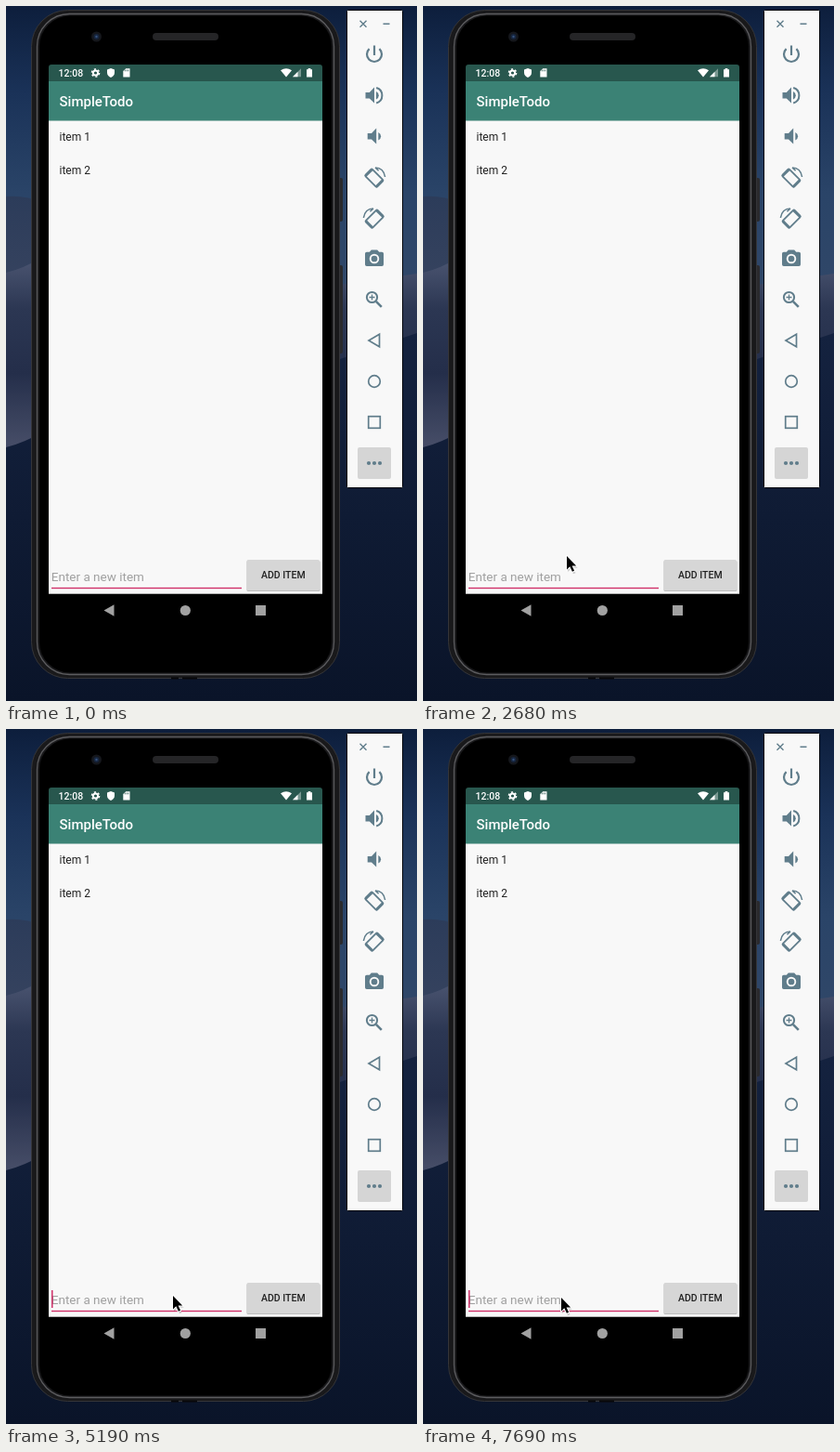
These frames come from a looping animation (443x748 px, 7.99 s). An HTML page:

```html
<!DOCTYPE html>
<html lang="en">
<head>
<meta charset="utf-8">
<title>Todo app</title>
<style>
  html, body { margin: 0; width: 100%; height: 100%; overflow: hidden; background: #0c1830; }
  svg { display: block; width: 100vw; height: 100vh; }
  text { font-family: Roboto, sans-serif; }
  .line { fill: none; stroke: #607d8b; stroke-width: 2; }
  .icon { fill: #607d8b; }
</style>
</head>
<body>
<svg viewBox="0 0 443 748" xmlns="http://www.w3.org/2000/svg">
  <defs>
    <linearGradient id="sky" x2="0" y2="1">
      <stop offset="0" stop-color="#0d1e3c"/>
      <stop offset=".3" stop-color="#1a3258"/>
      <stop offset=".65" stop-color="#2a4468"/>
      <stop offset="1" stop-color="#304768"/>
    </linearGradient>
    <linearGradient id="haze" x2="0" y2="1">
      <stop offset="0" stop-color="#2c3c5a"/>
      <stop offset="1" stop-color="#36435f"/>
    </linearGradient>
    <linearGradient id="dune" x2="0" y2="1">
      <stop offset="0" stop-color="#4c5672"/>
      <stop offset=".22" stop-color="#2c3753"/>
      <stop offset=".5" stop-color="#242e4a"/>
      <stop offset=".8" stop-color="#454c66"/>
    </linearGradient>
    <linearGradient id="sand" x2="0" y2="1">
      <stop offset="0" stop-color="#14223f"/>
      <stop offset="1" stop-color="#0a1429"/>
    </linearGradient>
  </defs>

  <!-- wallpaper -->
  <rect width="443" height="310" fill="url(#sky)"/>
  <path d="M0 205Q20 203 40 212V300H0Z" fill="url(#haze)"/>
  <path d="M0 287Q18 283 40 270L360 300L443 288V520H0Z" fill="url(#dune)"/>
  <path d="M0 475Q20 470 40 458L360 380L443 352V748H0Z" fill="url(#sand)"/>

  <!-- phone -->
  <g fill="#2a2a2d">
    <rect x="357" y="185" width="6" height="47" rx="2"/>
    <rect x="357" y="279" width="6" height="95" rx="2"/>
  </g>
  <rect x="27.5" y="4.5" width="332" height="719" rx="39" fill="#19191b" stroke="#353538"/>
  <rect x="33.5" y="8.5" width="320" height="711" rx="35" fill="none" stroke="#5c5c5f" stroke-width="1.3"/>
  <rect x="36" y="10.5" width="315" height="707" rx="33" fill="#000"/>
  <path d="M178 723.5h8M190 723.5h16" stroke="#08080a" stroke-width="2"/>
  <circle cx="97.5" cy="33" r="5.5" fill="#15171c"/>
  <circle cx="97.5" cy="33" r="3" fill="#17263f"/>
  <circle cx="97.5" cy="33" r="1.2" fill="#35527c"/>
  <rect x="158" y="29" width="71" height="8" rx="4" fill="#252527"/>

  <!-- screen -->
  <rect x="46" y="100" width="295" height="532.7" fill="#f8f8f8"/>
  <path d="M46 80.5V66Q46 63 49 63H338Q341 63 341 66V80.5Z" fill="#28574e"/>
  <rect x="46" y="80.5" width="295" height="43" fill="#3b8275"/>
  <g fill="#fff">
    <text x="56.5" y="75.5" font-size="10.5" font-weight="500">12:08</text>
    <circle cx="96.5" cy="72" r="2.6" fill="none" stroke="#fff" stroke-width="2"/>
    <circle cx="96.5" cy="72" r="4.1" fill="none" stroke="#fff" stroke-width="1.5" stroke-dasharray="2.15"/>
    <path d="M113 67l4 1.6v3.2q0 3.6-4 5.2q-4-1.6-4-5.2v-3.2Z"/>
    <path d="M129.2 67.2h4.3v9.4h-7.2v-6.5Z"/>
    <path d="M296 69.3q6-4.2 12 0l-6 7.2Z"/>
    <path d="M309 76.3l9-9v9Z" opacity=".38"/>
    <path d="M309 76.3l5.5-5.5v5.5Z"/>
    <path d="M324 68.2h1.7v-1.2h2.6v1.2h1.7v8.4h-6Z"/>
    <text x="57.5" y="108" font-size="15" font-weight="500">SimpleTodo</text>
  </g>
  <path d="M128.2 68.6v1.7M130 68.6v1.7M131.8 68.6v1.7" stroke="#28574e" stroke-width=".8"/>
  <g fill="#222" font-size="12">
    <text x="57.5" y="145.3">item 1</text>
    <text x="57.5" y="181.3">item 2</text>
  </g>
  <text x="48.8" y="619.3" font-size="13.5" fill="#a0a0a0">Enter a new item</text>
  <rect x="49" y="625.8" width="205" height="1.4" fill="#cf3068"/>
  <rect id="caret" x="49" y="604" width="1.5" height="19" fill="#cf3068"/>
  <rect x="259.5" y="597" width="79" height="33" rx="1.5" fill="#bdbdbd"/>
  <rect x="259.5" y="596" width="78.5" height="33" rx="1.5" fill="#d6d6d6"/>
  <text x="298.8" y="616.3" font-size="10.5" font-weight="500" fill="#222" text-anchor="middle">ADD ITEM</text>
  <g fill="#a1a1a1">
    <path d="M105.5 650.5L116.5 644.3V656.8Z"/>
    <circle cx="193.3" cy="650.5" r="5.6"/>
    <rect x="269" y="645" width="11" height="11"/>
  </g>

  <!-- emulator toolbar -->
  <rect x="367.5" y="4.5" width="60" height="514" rx="1" fill="#f8f8f8" stroke="#05070c"/>
  <path class="line" style="stroke-width:1.4" d="M381.5 15.7l7 7M388.5 15.7l-7 7M406.5 19.2h7"/>
  <path class="line" style="stroke-width:2.2" d="M397 42.5v10.5M391.6 46.1a8 8 0 1 0 10.8 0"/>
  <g class="icon">
    <path id="horn" d="M387.5 93v6.4h4.3l5.2 5.2v-17l-5.2 5.4Z"/>
    <path d="M399 92q2.8 1.2 2.8 4.2t-2.8 4.2Z"/>
    <use href="#horn" x="2.2" y="44"/>
    <path d="M401.3 136q2.8 1.2 2.8 4.2t-2.8 4.2Z"/>
  </g>
  <path class="line" d="M399.2 88a8.6 8.6 0 0 1 0 16.5"/>
  <g id="turn">
    <g transform="rotate(45 397 185)">
      <rect class="line" x="388" y="180" width="18" height="10.5" rx="1.2" style="stroke-width:1.8"/>
      <path class="line" d="M389 180v10.5M405 180v10.5" style="stroke-width:2.4"/>
    </g>
    <path class="line" d="M398 174q9 0 10.6 10M398 174l3.6 3.2" style="stroke-width:1.5"/>
  </g>
  <use href="#turn" transform="matrix(-1 0 0 1 794 44)"/>
  <path class="icon" d="M393.8 262.5h6.4l2 2.2h3q1.8 0 1.8 1.8v11.7q0 1.8-1.8 1.8h-16.4q-1.8 0-1.8-1.8v-11.7q0-1.8 1.8-1.8h3Z"/>
  <circle cx="397" cy="272" r="4.3" fill="#607d8b" stroke="#f8f8f8" stroke-width="1.9"/>
  <circle cx="394.5" cy="313.5" r="5.6" class="line"/>
  <path class="line" style="stroke-width:1.3" d="M391.5 313.5h6M394.5 310.5v6"/>
  <path class="line" style="stroke-width:2.6" d="M398.8 317.8l6 6"/>
  <path class="line" style="stroke-width:1.7" d="M391 360L402.5 353.3V366.7Z"/>
  <circle class="line" style="stroke-width:1.7" cx="397" cy="404" r="6.3"/>
  <rect class="line" style="stroke-width:1.7" x="390.7" y="441.7" width="12.6" height="12.6"/>
  <rect x="379" y="475" width="36" height="34" rx="2" fill="#d5d5d5"/>
  <g class="icon">
    <circle cx="391" cy="492" r="2.1"/>
    <circle cx="397" cy="492" r="2.1"/>
    <circle cx="403" cy="492" r="2.1"/>
  </g>

  <g id="mouse" stroke-linejoin="round">
    <path d="M1 2v15l3.4-3.2 2.6 5.4 2.5-1-2.5-5.4h4.7Z" fill="#000" opacity=".18"/>
    <path d="M0 0v14.4l3.3-3.1 2.6 5.5 2.2-1-2.5-5.3h4.6Z" fill="#000" stroke="#fff" stroke-width="2" paint-order="stroke"/>
  </g>
</svg>
<script>
  const LOOP = 7990;
  const caret = document.getElementById('caret');
  const mouse = document.getElementById('mouse');

  // Ticks during which the text caret is lit: [on, off)
  const blinks = [[1, 4], [8, 11], [14, 18], [21, 24], [28, 31], [34, 38], [41, 44], [48, 99]];

  // Pointer path: [tick, x, y]
  const path = [
    [11, 48, 228], [14, 222, 480], [18, 155, 592], [19, 155, 592], [21, 154, 613],
    [23, 154, 613], [25, 175, 613], [31, 236, 508], [35, 180, 610], [39, 171, 613],
    [44, 153, 613], [46, 149, 612], [55, 149, 612]
  ];

  const tickAt = t => t < 1650 ? Math.floor(t / 150) : 11 + Math.floor((t - 1644) / 147.3);

  const slope = (i, c) => (path[i + 1][c] - path[i][c]) / (path[i + 1][0] - path[i][0]);

  function tangent(i, c) {
    if (i === 0) return slope(0, c);
    if (i === path.length - 1) return 0;
    const a = slope(i - 1, c), b = slope(i, c);
    return a * b <= 0 ? 0 : 2 * a * b / (a + b);
  }

  // Smooth interpolation that never overshoots its keys
  function along(k, c) {
    let i = 0;
    while (i < path.length - 2 && k >= path[i + 1][0]) i++;
    const p = path[i], q = path[i + 1], w = q[0] - p[0], u = (k - p[0]) / w, v = 1 - u;
    return v * v * ((1 + 2 * u) * p[c] + u * w * tangent(i, c)) +
           u * u * ((3 - 2 * u) * q[c] - v * w * tangent(i + 1, c));
  }

  function draw(t) {
    const k = tickAt(t);
    const lit = blinks.some(([on, off]) => k >= on && k < off);
    caret.setAttribute('visibility', lit ? 'visible' : 'hidden');
    const shown = k >= path[0][0];
    mouse.setAttribute('visibility', shown ? 'visible' : 'hidden');
    if (shown) {
      mouse.setAttribute('transform', `translate(${Math.round(along(k, 1))} ${Math.round(along(k, 2))})`);
    }
  }

  const start = performance.now();
  function loop() {
    draw((performance.now() - start) % LOOP);
    requestAnimationFrame(loop);
  }
  loop();
</script>
</body>
</html>
```
